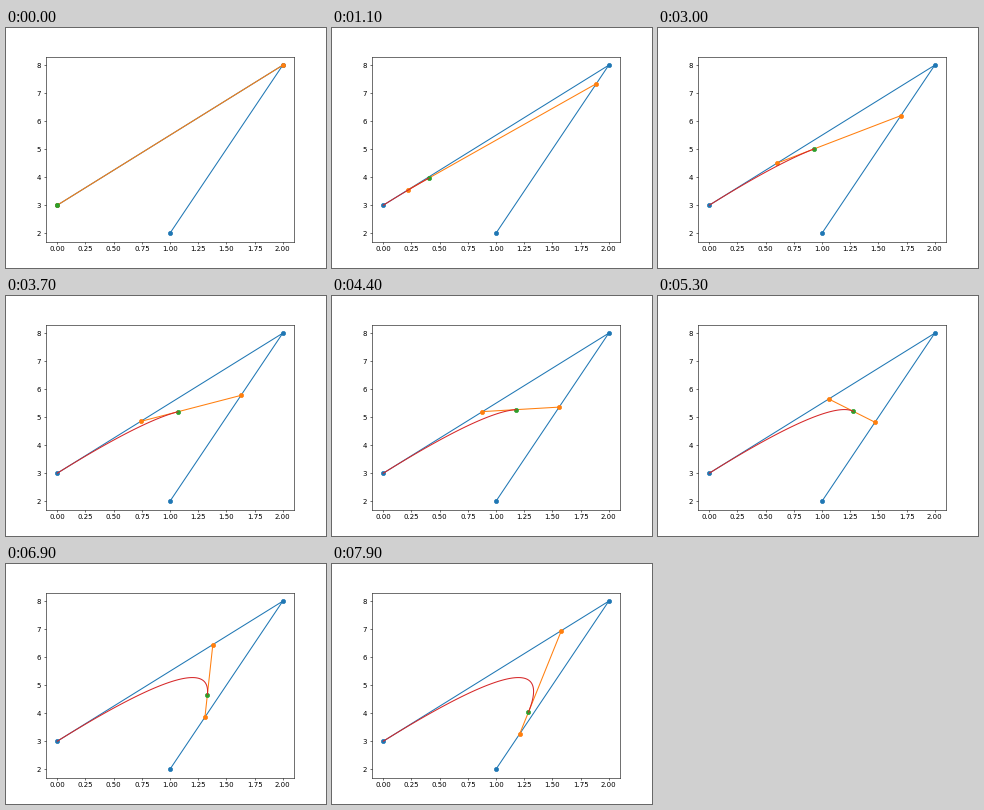
A matplotlib script for the animation above (8000 ms loop, 320 px wide and 240 px high).

```python
import numpy as np
import matplotlib.pyplot as plt
from matplotlib.animation import FuncAnimation

FRAMES = 80
INTERVAL = 100
STEP = 0.01

control = np.array([[0, 3], [2, 8], [1, 2]], dtype=float)


def lerp(points, t):
    """One de Casteljau level: interpolate between neighbouring points."""
    return (1 - t) * points[:-1] + t * points[1:]


def bezier(t):
    return lerp(lerp(control, t), t)[0]


curve = np.array([bezier(i * STEP) for i in range(FRAMES)])

fig, ax = plt.subplots(figsize=(6.4, 4.8), dpi=50)
ax.plot(*control.T, "o-", color="C0")
segment, = ax.plot([], [], "o-", color="C1")
point, = ax.plot([], [], "o", color="C2")
trail, = ax.plot([], [], "-", color="C3")
ax.set_xlim(-0.1, 2.1)
ax.set_ylim(1.7, 8.3)


def update(i):
    segment.set_data(*lerp(control, i * STEP).T)
    point.set_data(*curve[i:i + 1].T)
    trail.set_data(*curve[:i + 1].T)
    return segment, point, trail


anim = FuncAnimation(fig, update, frames=FRAMES, interval=INTERVAL,
                     init_func=lambda: update(0), repeat=True, repeat_delay=0)
plt.show()
```
